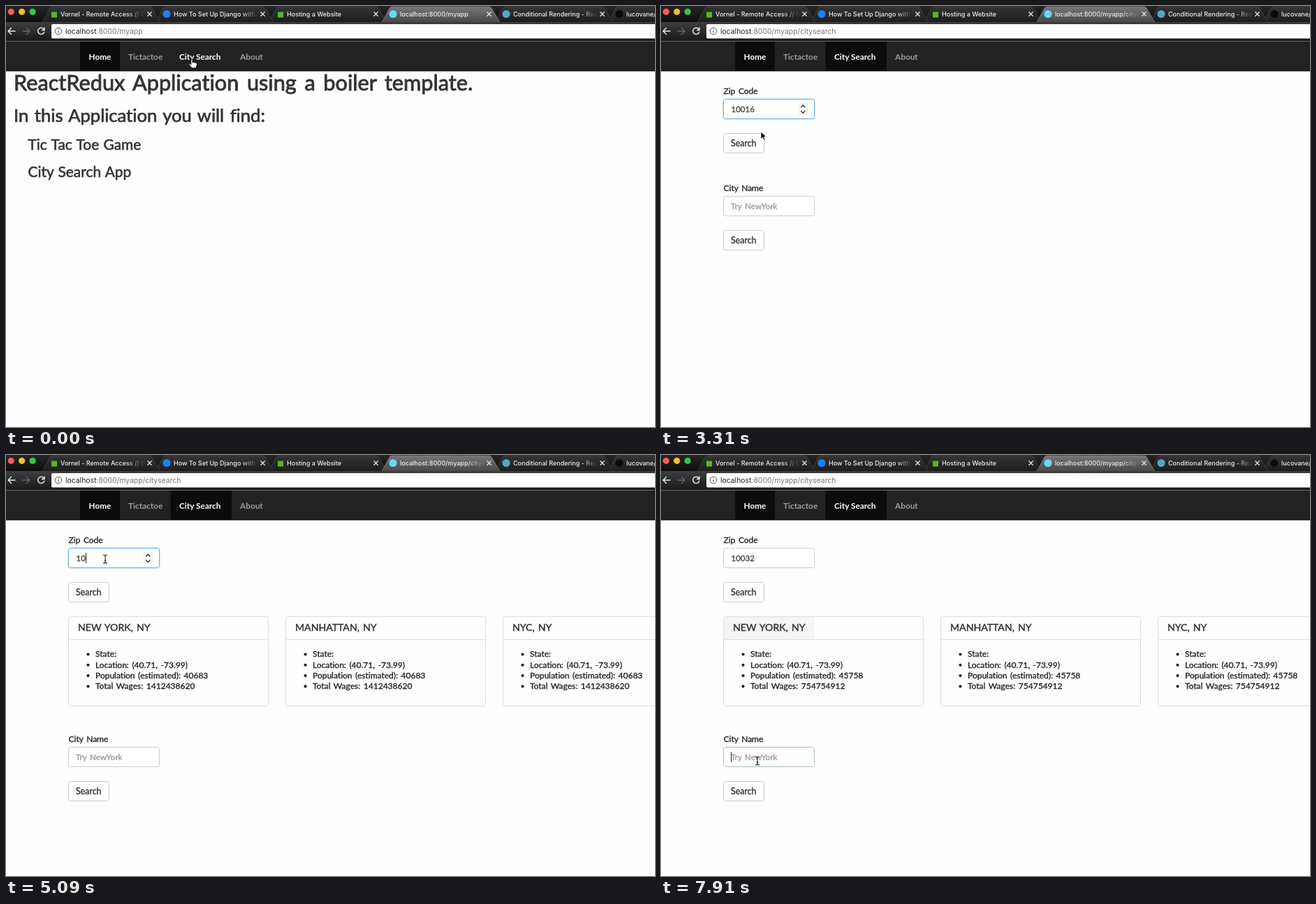
An HTML page for the animation above (8 s loop, 929 px wide and 603 px high).

```html
<!DOCTYPE html>
<html lang="en">
<head>
<meta charset="utf-8">
<title>City search</title>
<style>
html, body { margin: 0; width: 929px; height: 603px; overflow: hidden; background: #fefefe; }
svg { display: block; }
text {
  font-family: Lato, sans-serif; font-variant-ligatures: none; white-space: pre;
  color: #333; fill: currentColor; stroke: currentColor; stroke-width: .028em;
}
.h1 { font-size: 30.7px; word-spacing: 3.8px; }
.h2 { font-size: 25.6px; word-spacing: 2px; }
.h3 { font-size: 20.9px; word-spacing: 1px; }
.title { font-size: 14.1px; word-spacing: 1.5px; }
.body { font-size: 12px; word-spacing: 1.5px; color: #222; }
.btn-text { font-size: 12.4px; }
.nav { font-size: 11.8px; font-weight: 700; color: #9d9d9d; stroke: none; }
.nav.on { color: #fff; }
.value { font-size: 11.5px; color: #444; }
.hint { font-size: 11.7px; word-spacing: 1.5px; color: #999; }
.tab, .url { font-family: Inter, sans-serif; stroke: none; }
.tab { font-size: 9px; font-weight: 500; color: #eee; }
.url { font-size: 10.4px; color: #777; }
.host { fill: #222; }
.input, .btn { fill: #fff; stroke: #ccc; }
.input.warm { stroke: #a9b9c8; }
.input.focus { stroke: #66afe9; filter: drop-shadow(0 0 1.5px #66afe988); }
.btn.hover { fill: #e6e6e6; stroke: #adadad; }
.btn.focus { fill: #e6e6e6; stroke: #8c8c8c; }
.ring { fill: none; stroke: #6aa9ee; stroke-width: 2; }
.panel { fill: none; stroke: #ddd; }
.caret { stroke: #222; }
.line { fill: none; stroke-width: 1.4; stroke-linecap: round; stroke-linejoin: round; }
</style>
</head>
<body>
<svg id="stage" width="929" height="603" viewBox="0 0 929 603">
  <defs>
    <linearGradient id="strip" x2="0" y2="1"><stop stop-color="#262626"/><stop offset="1" stop-color="#0c0c0c"/></linearGradient>
    <linearGradient id="idle" x2="0" y2="1"><stop stop-color="#343434"/><stop offset="1" stop-color="#1d1d1d"/></linearGradient>
    <linearGradient id="active" x2="0" y2="1"><stop stop-color="#777"/><stop offset="1" stop-color="#484848"/></linearGradient>
    <linearGradient id="bar" x2="0" y2="1"><stop stop-color="#3e3e3e"/><stop offset="1" stop-color="#191919"/></linearGradient>
    <linearGradient id="fadeOut" gradientUnits="userSpaceOnUse" x1="121" x2="146" y1="0" y2="0"><stop stop-color="#fff"/><stop offset="1" stop-color="#000"/></linearGradient>
    <mask id="fade" maskUnits="userSpaceOnUse" x="0" y="0" width="146" height="24"><rect width="146" height="24" fill="url(#fadeOut)"/></mask>
    <path id="arrow" d="M0 0V10.6L2.5 8.3 4.2 12 6 11.2 4.4 7.6H7.8Z" fill="#000" stroke="#fff" stroke-width=".8"/>
    <path id="hand" d="M-1.3 8V1a1.2 1.2 0 0 1 2.4 0V5q0-1 1.2-.9 1 .1 1.1 1.2 .2-.8 1.2-.7 1 .2 1 1.2 .3-.6 1.1-.4 .8 .3 .8 1.3V9l-1 2v2H0L-1.5 11-4 8.2q-.6-1.2 .5-1.6 1-.2 2.2 1.4z" fill="#fff" stroke="#000"/>
    <path id="beam" d="M-3-6Q0-6 0-4 0-6 3-6M0-4V4M-3 6Q0 6 0 4 0 6 3 6M-1.5 2H1.5" fill="none" stroke="#222" stroke-width="1.1"/>
  </defs>
  <g id="chrome"></g>
  <g id="page"></g>
  <use id="cursor"/>
</svg>
<script>
const $ = id => document.getElementById(id);
const text = (x, y, cls, str) => `<text x="${x}" y="${y}" class="${cls}">${str}</text>`;
const rect = (x, y, w, h, attrs) => `<rect x="${x}" y="${y}" width="${w}" height="${h}" ${attrs}/>`;
const path = (d, attrs) => `<path d="${d}" ${attrs}/>`;
const dot = (x, y, r, fill) => `<circle cx="${x}" cy="${y}" r="${r}" fill="${fill}"/>`;
const cls = (base, extra) => `class="${extra ? base + ' ' + extra : base}"`;

const TABS = [
  ['#55b81f', 'Vornel - Remote Access // Guides'],
  ['#1a80f5', 'How To Set Up Django with Postgres'],
  ['#55b81f', 'Hosting a Website'],
  ['#61dafb', ''],
  ['#4fa9c4', 'Conditional Rendering - React'],
  ['#0b0b0b', 'lucovane/react'],
];
const ACTIVE = 3;

// Each step changes only the listed parts of the state.
const STEPS = [
  [0, { view: 'home', url: '/myapp', cur: ['hand', 266, 76] }],
  [150, { cur: ['hand', 269, 75.5] }],
  [920, { view: 'search' }],
  [1070, { url: '/myapp/citysearch' }],
  [1370, { cur: ['arrow', 238, 104] }],
  [1520, { cur: ['arrow', 184, 138] }],
  [1670, { cur: ['beam', 155, 159], spin: true }],
  [1820, { zipBox: 'warm', caret: 'zip' }],
  [1970, { zipBox: 'focus' }],
  [2420, { zip: '1' }],
  [2570, { zip: '10' }],
  [2720, { zip: '1001' }],
  [2870, { zip: '10016' }],
  [3160, { caret: '', cur: ['arrow', 150, 167] }],
  [3310, { cur: ['arrow', 143, 180] }],
  [3460, { btn: 'hover', cur: ['hand', 126, 198] }],
  [3610, { btn: 'focus', zipBox: '', spin: false, cur: ['hand', 123.5, 204] }],
  [3760, { cards: ['40683', '1412438620'] }],
  [4190, { cur: ['hand', 124, 203] }],
  [4490, { spin: true, cur: ['beam', 142, 149] }],
  [4640, { btn: '', zipBox: 'focus', caret: 'zip' }],
  [5090, { zip: '10' }],
  [5240, { zip: '1003' }],
  [5380, { zip: '10032' }],
  [5680, { cur: ['arrow', 136, 167] }],
  [5830, { btn: 'hover', cur: ['hand', 125, 189] }],
  [5970, { cur: ['hand', 121.5, 194.5] }],
  [6560, { btn: 'focus', zipBox: '', spin: false, caret: '' }],
  [6710, { cards: ['45758', '754754912'] }],
  [7160, { cur: ['arrow', 177, 366] }],
  [7460, { cur: ['arrow', 160, 396] }],
  [7610, { cur: ['beam', 143, 430] }],
  [7760, { cur: ['beam', 138, 438] }],
  [7910, { btn: '', cityBox: 'warm', caret: 'city', shade: true }],
];
const LOOP = 8000;

const states = [];
STEPS.reduce((prev, [at, change]) => {
  const state = { ...prev, ...change, at };
  states.push(state);
  return state;
}, { zip: '', caret: '', btn: '', zipBox: '', cityBox: '', cards: null, spin: false, shade: false });

function tab(i, url) {
  const on = i === ACTIVE, [color, title] = TABS[i];
  const icon = color === '#55b81f' ? rect(12, 8.5, 8, 8, `fill="${color}"`) : dot(15, 11.5, 5.5, color);
  return `<g transform="translate(${53 + 162 * i})">
    ${path('M-1 23.5L10 3Q11 1 14 1H152Q155 1 156 3L168 23.5Z', `fill="url(#${on ? 'active' : 'idle'})" stroke="${on ? '#888' : '#484848'}" stroke-width=".7"`)}
    ${icon}<g mask="url(#fade)">${text(25, 14.7, 'tab', on ? 'localhost:8000' + url : title)}</g>
    ${path('M149.8 8.8l5.4 5.4m0-5.4l-5.4 5.4', 'class="line" stroke="#ddd"')}</g>`;
}

function chrome(s) {
  const tabs = [5, 4, 2, 1, 0, ACTIVE].map(i => tab(i, s.url)).join('');
  return rect(0, 0, 929, 24, 'fill="url(#strip)"') + tabs
    + ['#fc5b57', '#fdbc2e', '#34c84a'].map((c, i) => dot(7.3 + 15.4 * i, 8.3, 4.6, c)).join('')
    + rect(0, 23, 929, 27, 'fill="url(#bar)"') + rect(0, 50, 929, 1, 'fill="#666"')
    + rect(65, 26, 870, 20.5, 'rx="2" fill="#fefefe"')
    + path('M13 36H3m4.5-4.5L3 36l4.5 4.5', 'class="line" stroke="#eee"')
    + path('M24 36h10m-4.5-4.5L34 36l-4.5 4.5', 'class="line" stroke="#666"')
    + path('M54 33.2a4.6 4.6 0 1 0 .7 4M55 31v3.5h-3.5', 'class="line" stroke="#eee"')
    + '<circle cx="75" cy="36" r="4.8" fill="none" stroke="#555"/>' + path('M75 35.5v3M75 33v1', 'stroke="#555" stroke-width="1.2"')
    + text(85, 39.7, 'url', `<tspan class="host">localhost</tspan>:8000${s.url}`)
    + navbar(s.view === 'search');
}

function navbar(active) {
  return rect(0, 51, 929, 42, 'fill="#222"') + rect(0, 92.5, 929, 1, 'fill="#080808"')
    + rect(106, 51, 57, 42, 'fill="#0c0c0c"') + (active ? rect(235.5, 51, 87.5, 42, 'fill="#0c0c0c"') : '')
    + text(118.5, 76.5, 'nav on', 'Home') + text(175, 76.5, 'nav', 'Tictactoe')
    + text(248, 76.5, 'nav on', 'City Search') + text(335, 76.5, 'nav', 'About');
}

const home = () => text(11, 121, 'h1', 'ReactRedux Application using a boiler template.')
  + text(11, 165.5, 'h2', 'In this Application you will find:')
  + text(31.5, 205.5, 'h3', 'Tic Tac Toe Game') + text(31.5, 244.5, 'h3', 'City Search App');

// A labelled input with its button; y is the top of the input.
function field(y, label, hint, value, box, btn) {
  return text(89.5, y - 7.3, 'body', label)
    + rect(89.5, y, 130, 28, `rx="3" ${cls('input', box)}`)
    + (value ? text(100.5, y + 18.5, 'value', `<tspan id="zip">${value}</tspan>`) : text(100, y + 18.3, 'hint', hint))
    + rect(89.5, y + 49, 58, 28, `rx="3" ${cls('btn', btn)}`)
    + (btn === 'focus' ? rect(89, y + 48.5, 59.5, 29, 'rx="3" class="ring"') : '')
    + text(100, y + 67.7, 'btn-text', 'Search');
}

const spinner = () => rect(197.5, 139.5, 12, 16, 'rx="2" fill="#fafafa" stroke="#e8e8e8"')
  + path('M200.5 145l2.8-3 2.8 3M200.5 150.5l2.8 3 2.8-3', 'class="line" stroke="#444"');

function card(name, i, [people, wages]) {
  const x = 89.5 + 311 * i;
  const rows = ['State:', 'Location: (40.71, -73.99)', 'Population (estimated): ' + people, 'Total Wages: ' + wages];
  return rect(x, 231.5, 286, 128, 'rx="3" class="panel"') + path(`M${x} 264.5h286`, 'class="panel"')
    + text(x + 13.5, 252.3, 'title', name)
    + rows.map((row, r) => dot(x + 28, 285.5 + 15.3 * r, 2.1, '#222') + text(x + 38.5, 289.3 + 15.3 * r, 'body', row)).join('');
}

function search(s) {
  const cityY = s.cards ? 418.5 : 272.5;
  return field(133.5, 'Zip Code', 'Try 10016', s.zip, s.zipBox, s.btn)
    + (s.spin ? spinner() : '')
    + (s.shade ? rect(90, 232, 130, 32, 'fill="#f4f4f4"') : '')
    + (s.cards ? ['NEW YORK, NY', 'MANHATTAN, NY', 'NYC, NY'].map((n, i) => card(n, i, s.cards)).join('') : '')
    + field(cityY, 'City Name', 'Try NewYork', '', s.cityBox, '')
    + (s.caret ? `<path id="caret" class="caret" d="M100.5 ${(s.caret === 'zip' ? 133.5 : cityY) + 7}v14.5"/>` : '');
}

function show(s) {
  $('chrome').innerHTML = chrome(s);
  $('page').innerHTML = s.view === 'home' ? home() : search(s);
  if (s.caret === 'zip' && s.zip) {
    $('caret').setAttribute('transform', `translate(${Math.round($('zip').getComputedTextLength() + 1)})`);
  }
  const [kind, x, y] = s.cur;
  $('cursor').setAttribute('href', '#' + kind);
  $('cursor').setAttribute('transform', `translate(${x} ${y})`);
}

let shown;
const start = performance.now();
function frame(now) {
  const t = Math.max(0, now - start) % LOOP;
  const state = states.findLast(s => s.at <= t);
  if (state !== shown) show(shown = state);
  requestAnimationFrame(frame);
}
frame(start);
</script>
</body>
</html>
```
